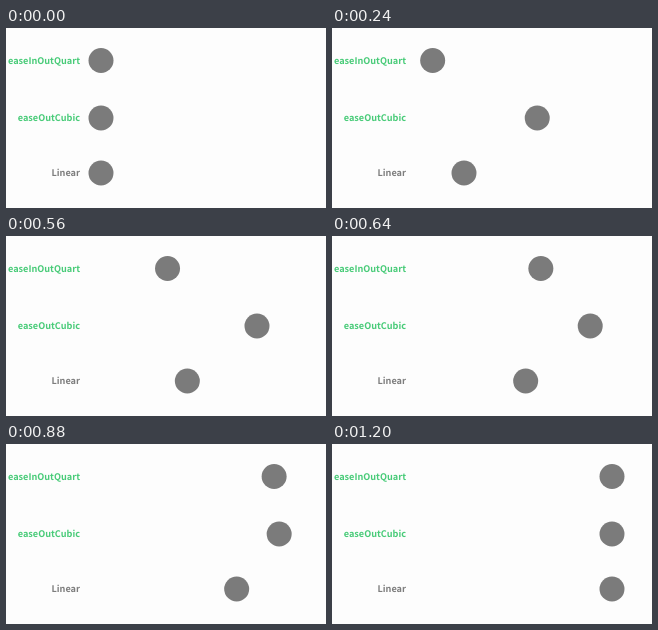
An HTML page for the animation above (2440 ms loop, 320 by 180 pixels).

```html
<!DOCTYPE html>
<html lang="en">
<head>
<meta charset="utf-8">
<title>Easing comparison</title>
<style>
  html, body { margin: 0; width: 100%; height: 100%; overflow: hidden; background: #fdfdfd; }
  svg { display: block; width: 100vw; height: 100vh; }
  text {
    font: 700 9.15px "Noto Sans CJK JP", "Noto Sans CJK SC", "Noto Sans CJK", "Open Sans", sans-serif;
    text-anchor: end;
    text-rendering: geometricPrecision;
  }
  .named { fill: #48cb78; }
  .plain { fill: #7d7d7d; }
  circle { fill: #7b7b7b; }
</style>
</head>
<body>
<svg viewBox="0 0 320 180">
  <text class="named" x="74" y="35.7">easeInOutQuart</text>
  <text class="named" x="74" y="93.3">easeOutCubic</text>
  <text class="plain" x="74" y="147.9">Linear</text>
  <circle id="quart" cx="95" cy="32.5" r="12.5"/>
  <circle id="cubic" cx="95" cy="90" r="12.5"/>
  <circle id="linear" cx="95" cy="145" r="12.5"/>
</svg>
<script>
const LOOP = 2440, MOVE = 1200, STEP = 40, START = 95, TRAVEL = 185;

// Same curve as CSS cubic-bezier(), solved by bisection.
function bezier(x1, y1, x2, y2) {
  const at = (s, a, b) => 3 * (1 - s) ** 2 * s * a + 3 * (1 - s) * s * s * b + s ** 3;
  return x => {
    if (x <= 0 || x >= 1) return x;
    let lo = 0, hi = 1;
    for (let i = 0; i < 40; i++) {
      const mid = (lo + hi) / 2;
      if (at(mid, x1, x2) < x) lo = mid; else hi = mid;
    }
    return at(lo, y1, y2);
  };
}

const curves = {
  quart: bezier(0.76, 0, 0.25, 1),
  cubic: bezier(0, 0.55, 0.456, 1),
  linear: x => x
};

// Positions are held for STEP ms each, then rest at the end.
// Animating cx keeps the edges crisp, unlike a transformed layer.
for (const [id, ease] of Object.entries(curves)) {
  const frames = [];
  const add = (time, p) => frames.push({
    offset: time / LOOP,
    cx: `${(START + TRAVEL * p).toFixed(3)}px`,
    easing: "steps(1, end)"
  });
  for (let t = 0; t <= MOVE; t += STEP) add(t, ease(t / MOVE));
  add(LOOP, 1);
  document.getElementById(id).animate(frames, { duration: LOOP, iterations: Infinity });
}
</script>
</body>
</html>
```
